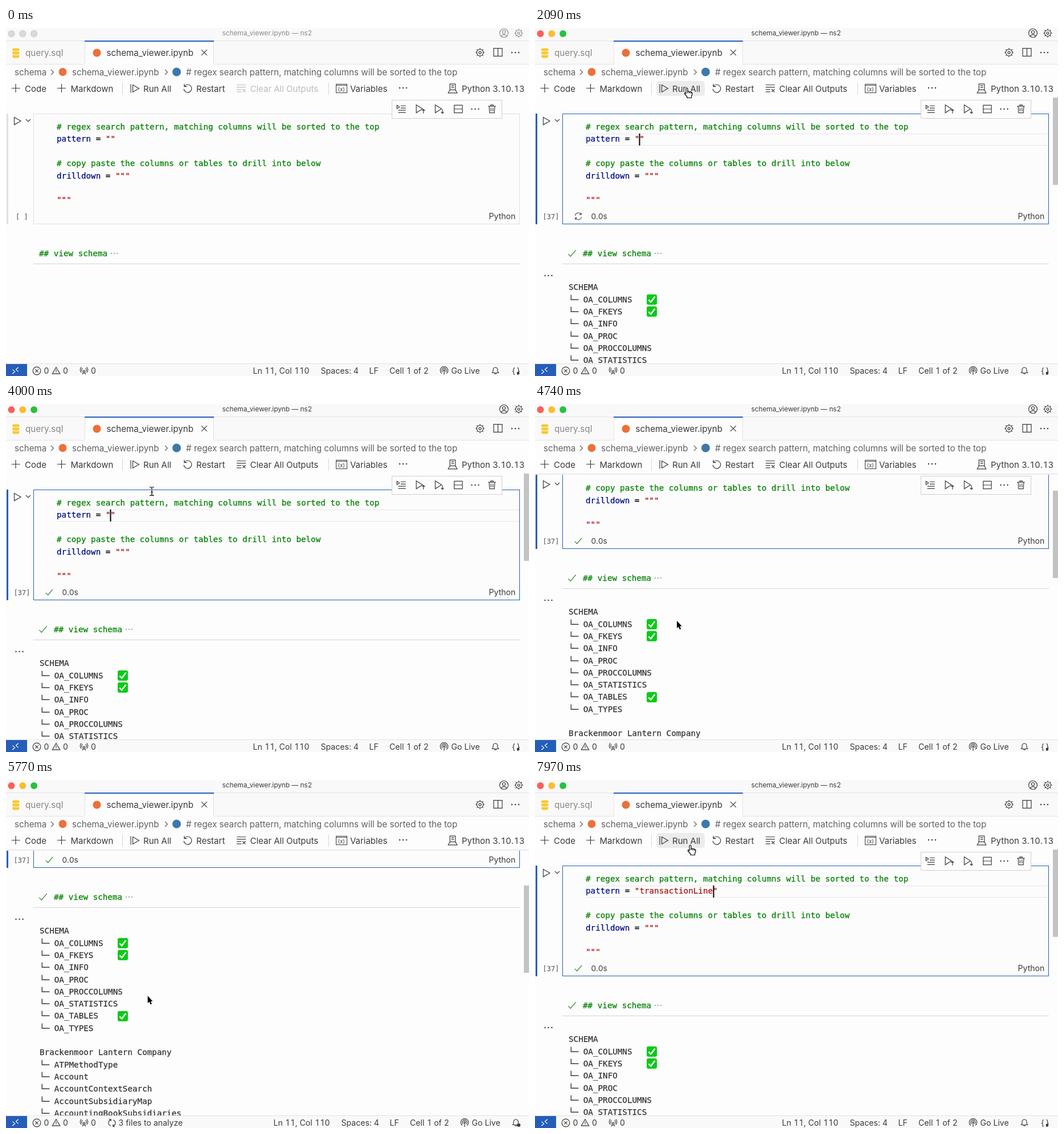
Animation, 918 px wide and 610 px high, one loop 8000 ms. Source, as an HTML page with a canvas:

```html
<!DOCTYPE html>
<html lang="en">
<head>
<meta charset="utf-8">
<title>Schema viewer</title>
<style>
html, body { margin: 0; width: 918px; height: 610px; overflow: hidden; background: #fdfdfd; }
canvas { display: block; }
</style>
</head>
<body>
<canvas id="stage" width="918" height="610"></canvas>
<script>
const ctx = document.getElementById('stage').getContext('2d');
const LOOP = 8000, START = 600, STEP = 147.4;
const UI = 'Inter, "Noto Sans", sans-serif';
const MONO = '"DejaVu Sans Mono", monospace';
const INK = '#3b3b3b', BLUE = '#255eb8', GREEN = '#008000', RED = '#a31515', NAVY = '#001080';
const LINE = '#e3e3e3', PAGE = '#fdfdfd', BAR = '#f9f9f9';

// Icons on a 16 unit grid
const ring = (r, x = 8, y = 8) => `M${x + r} ${y}A${r} ${r} 0 1 1 ${x - r} ${y}A${r} ${r} 0 1 1 ${x + r} ${y}`;
const gearTeeth = () => {
  let d = '';
  for (let i = 0; i < 8; i++) {
    const a = i * Math.PI / 4, c = Math.cos(a), s = Math.sin(a);
    d += `M${8 + 5 * c} ${8 + 5 * s}L${8 + 7 * c} ${8 + 7 * s}`;
  }
  return d;
};
const ICONS = {
  plus: 'M8 1.5V14.5M1.5 8H14.5',
  play: 'M3 2L13.5 8L3 14Z',
  right: 'M6 3.5L10.5 8L6 12.5',
  down: 'M4 6L8 10L12 6',
  close: 'M3.5 3.5L12.5 12.5M12.5 3.5L3.5 12.5',
  runAll: 'M5 2.5L14.5 8L5 13.5ZM2 1.5V14.5',
  restart: 'M3.2 4.5A6 6 0 1 1 2 8.8M2.7 1V5H6.8',
  clear: 'M1 3H15M1 6.5H15M1 10H8M1 13.5H8M10 9.5L14.5 14M14.5 9.5L10 14',
  gear: ring(5) + ring(1.8) + gearTeeth(),
  split: 'M1.5 2H14.5V14H1.5ZM8 2V14',
  rows: 'M1.5 2H14.5V14H1.5ZM1.5 8H14.5',
  lines: 'M1 2L5 4.8L1 7.5ZM7 3H15M7 6.5H15M3 10H15M3 13.5H15',
  above: 'M1.5 1.5L11.5 7.8L1.5 14ZM13 15V8.5M10.8 10.7L13 8.5L15.2 10.7',
  below: 'M1.5 1.5L11.5 7.8L1.5 14ZM13 8.5V15M10.8 12.8L13 15L15.2 12.8',
  trash: 'M2 4H14M6 4V2H10V4M3.5 4L4.2 14.5H11.8L12.5 4M6.5 6.5V12M9.5 6.5V12',
  kernel: 'M4 1.5H12V10H4ZM6 4H10M6 6.5H10M4 10L1.5 14.5H14.5L12 10',
  bell: 'M2.5 12H13.5L12 9.8V6.5A4 4 0 0 0 4 6.5V9.8ZM6.5 12.5A1.5 1.5 0 0 0 9.5 12.5',
  sync: 'M2.5 7A5.6 5.6 0 0 1 13 5M13.3 1.8V5.2H10M13.5 9A5.6 5.6 0 0 1 3 11M2.7 14.2V10.8H6',
  tower: 'M8 7L5 15M8 7L11 15M6 12.5H10M5 3.5A4 4 0 0 0 5 9.5M11 3.5A4 4 0 0 1 11 9.5M3 1.5A7 7 0 0 0 3 11.5M13 1.5A7 7 0 0 1 13 11.5',
  cast: ring(1.4, 8, 7) + 'M8 8.5V15M5.2 10A4 4 0 1 1 10.8 10M3.8 12.5A6.7 6.7 0 1 1 12.2 12.5',
  error: ring(6.5) + 'M5.5 5.5L10.5 10.5M10.5 5.5L5.5 10.5',
  warn: 'M8 2L15 14H1ZM8 6.5V10M8 11.3V12.5',
  account: ring(6.8) + ring(2.4, 8, 6.3) + 'M3.8 13.2A4.5 4.5 0 0 1 12.2 13.2',
  check: 'M1.5 9L5.5 13L14.5 2.5',
  remote: 'M2.5 6L7 10L2.5 14M13.5 2L9 6L13.5 10'
};

function icon(name, x, y, color = INK, scale = 1.15, turn = 0) {
  ctx.save();
  ctx.translate(x, y);
  ctx.rotate(turn);
  ctx.scale(scale, scale);
  ctx.translate(-8, -8);
  ctx.strokeStyle = color;
  ctx.lineWidth = 1.2 / scale;
  ctx.stroke(new Path2D(ICONS[name]));
  ctx.restore();
}
function rect(x, y, w, h, color) {
  ctx.fillStyle = color;
  ctx.fillRect(x, y, w, h);
}
function box(x, y, w, h, fill, stroke) {
  rect(x, y, w, h, fill);
  ctx.strokeStyle = stroke;
  ctx.lineWidth = 1;
  ctx.strokeRect(x + 0.5, y + 0.5, w - 1, h - 1);
}
function dot(x, y, r, color) {
  ctx.fillStyle = color;
  ctx.beginPath();
  ctx.arc(x, y, r, 0, 7);
  ctx.fill();
}
function dots(x, y, color = INK, gap = 6) {
  for (let i = -1; i < 2; i++) dot(x + i * gap, y, gap / 5, color);
}
// y is the middle of the capitals; digits share one width
function text(s, x, y, color = INK, size = 15) {
  ctx.font = size + 'px ' + UI;
  ctx.fillStyle = color;
  const digit = ctx.measureText('0').width;
  for (const part of s.split(/(\d)/)) {
    const w = ctx.measureText(part).width, isDigit = /\d/.test(part);
    ctx.fillText(part, x + (isDigit ? (digit - w) / 2 : 0), y + size * 0.35);
    x += isDigit ? digit : w;
  }
}
function code(s, x, y, color, size = 14.25) {
  ctx.font = size + 'px ' + MONO;
  ctx.fillStyle = ctx.strokeStyle = color;
  ctx.lineWidth = 0.25;
  ctx.fillText(s, x, y + size * 0.35);
  ctx.strokeText(s, x, y + size * 0.35);
}
const CHAR = 8.58;

// Pointer and scroll positions by step
const MOUSE = [[0, 862, 352], [1, 730, 300], [2, 570, 232], [3, 425, 172], [4, 325, 130], [5, 280, 110],
  [6, 266, 104], [7, 267, 105], [14, 267, 105], [15, 268, 107], [16, 268, 107], [20, 266, 117], [21, 262, 128],
  [23, 256, 153], [24, 254, 200], [25, 251, 300], [26, 249, 380], [33, 249, 380], [40, 248, 374], [42, 248, 372],
  [43, 249, 350], [44, 252, 300], [45, 256, 236], [46, 262, 180], [47, 268, 142], [48, 271, 124],
  [49, 273, 116], [50, 273, 114]];
const SCROLL = [[26, 0], [27, 34], [28, 90], [29, 146], [30, 192], [31, 224], [32, 243], [33, 252],
  [34, 240], [35, 190], [36, 115], [37, 45], [38, 0]];

function track(keys, k, n) {
  if (k <= keys[0][0]) return keys[0][n];
  for (let i = 1; i < keys.length; i++) {
    const a = keys[i - 1], b = keys[i];
    if (k <= b[0]) return a[n] + (b[n] - a[n]) * (k - a[0]) / (b[0] - a[0]);
  }
  return keys[keys.length - 1][n];
}

const TREE = ['SCHEMA', '+OA_COLUMNS', '+OA_FKEYS', '+OA_INFO', '+OA_PROC', '+OA_PROCCOLUMNS', '+OA_STATISTICS',
  '+OA_TABLES', '+OA_TYPES', '', 'Brackenmoor Lantern Company', '+ATPMethodType', '+Account',
  '+AccountContextSearch', '+AccountSubsidiaryMap', '+AccountingBookSubsidiaries', '+AccountingContext',
  '+ActionType', '+Activity'];
const TICKED = [1, 2, 7];

function tickBox(x, y) {
  ctx.fillStyle = '#0bca18';
  ctx.beginPath();
  ctx.roundRect(x, y, 18, 18, 3);
  ctx.fill();
  ctx.strokeStyle = '#fff';
  ctx.lineWidth = 2.4;
  ctx.stroke(new Path2D(`M${x + 3.5} ${y + 9.5}L${x + 7.2} ${y + 13.5}L${x + 14.5} ${y + 4}`));
}

function insertButtons(y) {
  box(362, y, 71, 28, PAGE, '#d0d0d0');
  icon('plus', 376, y + 13, INK, 1);
  text('Code', 391, y + 14, INK, 14);
  box(451, y, 103, 28, PAGE, '#d0d0d0');
  icon('plus', 465, y + 13, INK, 1);
  text('Markdown', 479, y + 14, INK, 14);
}

function notebook(s) {
  const { k, top, my } = s;
  ctx.save();
  ctx.beginPath();
  ctx.rect(0, 122, 918, 466);
  ctx.clip();

  const edge = s.active ? BLUE : '#e0e0e0', bottom = 344 - top;
  rect(1, 150 - top, 3, 194, edge);
  box(48, 150 - top, 854, 194, '#fcfcfc', edge);
  if (s.active) {
    rect(89, 185 - top, 812, 1, '#e9e9e9');
    rect(89, 205 - top, 812, 1, '#e9e9e9');
  }
  code('# regex search pattern, matching columns will be sorted to the top', 89, 173 - top, GREEN);
  code('pattern', 89, 194.5 - top, NAVY);
  code('=', 89 + 8 * CHAR, 194.5 - top, '#000');
  const word = k >= 41 ? 'transactionLine' : '';
  code('"' + word + '"', 89 + 10 * CHAR, 194.5 - top, RED);
  if (s.caret) rect(Math.round(89 + (11 + word.length) * CHAR) - 0.5 + (word ? 1 : 0), 185 - top, 2, 21, '#000');
  code('# copy paste the columns or tables to drill into below', 89, 237.5 - top, GREEN);
  code('drilldown', 89, 259 - top, NAVY);
  code('=', 89 + 10 * CHAR, 259 - top, '#000');
  code('"""', 89 + 12 * CHAR, 259 - top, RED);
  code('"""', 89, 301.5 - top, RED);

  if (bottom > 165) {
    const y = Math.max(163 - top, 141);
    icon('play', 20, y, INK, 1.1);
    icon('down', 39, y - 1, INK, 1);
  }
  const count = k < 9 ? '[ ]' : k < 10 ? '[*]' : '[37]';
  code(count, count.length > 3 ? 13.5 : 17, 331 - top, '#707070', 12);
  if (k >= 9) {
    if (k < 12) icon('sync', 76, 330 - top, '#555', 1, k * 0.9 - 9);
    else icon('check', 76, 330 - top, '#388a34', 0.95);
    text('0.0s', 98.5, 330 - top, INK, 13.6);
  }
  text('Python', 847.5, 330 - top, INK, 14.1);

  if (bottom > 165) {
    box(677, 126, 194, 33, PAGE, '#d0d0d0');
    ['lines', 'above', 'below', 'rows'].forEach((n, i) => icon(n, 694 + i * 33.3, 142, INK, 1.1));
    dots(823.5, 142);
    icon('trash', 853, 141.5, INK, 1.1);
  }

  // Folded second cell
  const ran = k >= 9, x = ran ? 84 : 58;
  if (k >= 10) icon('check', 65, 395 - top, '#388a34', 1.05);
  else if (ran) icon('sync', 65, 395 - top, '#555', 1);
  code('## view schema', x, 395.5 - top, GREEN);
  dots(x + 132, 395 - top, '#888', 5);
  rect(48, 413 - top, 854, 1, '#d3d3d3');

  if (k >= 10) {
    dots(23.5, 434 - top);
    TREE.forEach((row, i) => {
      const y = 454.2 + i * 21.33 - top;
      code(row.replace('+', '└─ '), 59, y, '#333');
      if (TICKED.includes(i)) tickBox(196, Math.round(y - 8.6));
    });
  }

  if (s.active && my > 344 - top && my < 394 - top) insertButtons(337 - top);
  if (k > 16 && !top && my > 119 && my < 150) insertButtons(123);
  if (top > 5) {
    rect(0, 122, 918, 1, '#e2e2e2');
    rect(0, 123, 918, 1, '#f3f3f3');
  }
  if (k >= 10 && (k < 15 || k > 20)) rect(909, 122 + Math.round(top / 3), 9, 153, '#c3c3c3');
  ctx.restore();
}

function header(s) {
  const top = s.active ? INK : '#8a8a8a';
  rect(0, 0, 918, 122, PAGE);
  rect(0, 0, 918, 22, BAR);
  ['#fb5f57', '#fdbc2e', '#28c23f'].forEach((c, i) => {
    dot(9.5 + i * 19.8, 10, 6, s.active ? c : '#c4c4c4');
    if (!s.active) dot(9.5 + i * 19.8, 10, 5.2, '#dadada');
  });
  text('schema_viewer.ipynb — ns2', 379.5, 9, top, 11.8);
  icon('account', 874, 9, top, 1.1);
  icon('gear', 900, 9, top, 1.1);

  rect(0, 22, 918, 42, BAR);
  rect(0, 22, 918, 1, LINE);
  rect(0, 63, 918, 1, LINE);
  rect(138, 22, 227, 42, PAGE);
  rect(138, 22, 1, 42, LINE);
  rect(364, 22, 1, 42, LINE);
  rect(138, 22, 227, 2, BLUE);

  // Database drum
  ctx.fillStyle = '#f5c932';
  for (let i = 0; i < 3; i++) {
    ctx.beginPath();
    ctx.roundRect(11, 35.5 + i * 6, 12.5, 5, [i ? 1 : 4, i ? 1 : 4, 4, 4]);
    ctx.fill();
  }
  text('query.sql', 34, 44, '#868686', 15.2);
  dot(159.5, 43.5, 7, '#ec7038');
  text('schema_viewer.ipynb', 176.5, 44, INK, 15.2);
  icon('close', 348, 43, INK, 1.1);
  icon('gear', 832, 43, INK, 1.15);
  icon('split', 863.5, 42.5, INK, 1.15);
  dots(894, 43);

  const soft = '#616161';
  text('schema', 15, 78, soft, 15.2);
  icon('right', 81, 77.5, soft, 1);
  dot(99.5, 77, 7, '#ec7038');
  text('schema_viewer.ipynb', 116, 78, soft, 15.2);
  icon('right', 281, 77.5, soft, 1);
  dot(299.5, 77, 7.5, '#3d78ab');
  text('# regex search pattern, matching columns will be sorted to the top', 316, 78, soft, 15.2);

  if (s.hover) {
    ctx.fillStyle = '#ececec';
    ctx.beginPath();
    ctx.roundRect(213, 93, 85, 26, 5);
    ctx.fill();
  }
  icon('plus', 17, 105.5);
  text('Code', 33, 106.5);
  icon('plus', 97.5, 105.5);
  text('Markdown', 113.5, 106.5);
  rect(204, 96, 1, 21, '#d4d4d4');
  icon('runAll', 226, 106);
  text('Run All', 241, 106.5);
  icon('restart', 319, 106);
  text('Restart', 334, 106.5);
  const faint = s.k >= 9 ? INK : '#bcbcbc';
  icon('clear', 413, 105.5, faint);
  text('Clear All Outputs', 428.5, 106.5, faint);
  rect(566, 96, 1, 21, '#d4d4d4');
  box(579, 98, 20, 16, PAGE, INK);
  rect(579, 100, 20, 1, INK);
  text('(x)', 582.5, 107.5, INK, 9.5);
  text('Variables', 604, 106.5);
  dots(697, 105);
  icon('kernel', 784, 106, INK, 1.2);
  text('Python 3.10.13', 800, 106.5);
}

function statusBar(s) {
  rect(0, 588, 918, 22, BAR);
  rect(0, 588, 918, 1, LINE);
  rect(0, 589, 37, 21, BLUE);
  icon('remote', 16.5, 600.5, '#fff', 0.95);
  const t = (str, x) => text(str, x, 601, INK, 14.1);
  icon('error', 54, 601, INK, 1.05);
  t('0', 66.5);
  icon('warn', 88, 600.5, INK, 0.95);
  t('0', 100);
  icon('tower', 137, 600.5, INK, 0.95);
  t('0', 149);
  const busy = s.k >= 32 && s.k < 38, dx = busy ? 36 : 0;
  if (busy) {
    icon('sync', 186, 601, INK, 1, (s.k - 33) * 0.9);
    t('3 files to analyze', 197.5);
  }
  t('Ln 11, Col 110', 433.5 + dx);
  t('Spaces: 4', 552.5 + dx);
  t('LF', 637.5 + dx);
  t('Cell 1 of 2', 673 + dx);
  icon('cast', 769 + dx, 601, INK, 1);
  t('Go Live', 781.5 + dx);
  icon('bell', 859 + dx, 600.5, INK, 1);
  if (busy) dot(900, 605, 3, INK);
  else {
    t('{', 888);
    t('}', 896.5);
    dot(899, 605, 2.4, INK);
  }
}

function pointer(kind, x, y) {
  const shape = {
    arrow: 'M0 0V13L3 10.4L5 15.2L7.2 14.3L5.2 9.6H8.8Z',
    hand: 'M-2 1.5Q-2 0 -.5 0T1 1.5V6.5Q3 5.5 4 7Q6 6 7 7.7Q9 7.2 9 9.5Q9 13 7.5 15V17.5H0V15.5L-4.5 10.5Q-5 8.5 -3.5 8.5L-2 10Z',
    beam: 'M-4 -7.5Q0 -7.5 0 -5.5Q0 -7.5 4 -7.5M0 -5.5V5.5M-4 7.5Q0 7.5 0 5.5Q0 7.5 4 7.5M-2 1.5H2'
  }[kind];
  const path = new Path2D(shape);
  ctx.save();
  ctx.translate(x, y);
  ctx.lineJoin = 'round';
  ctx.strokeStyle = '#fff';
  ctx.lineWidth = kind === 'hand' ? 3 : 2.4;
  ctx.stroke(path);
  if (kind === 'arrow') {
    ctx.fillStyle = '#000';
    ctx.fill(path);
  } else {
    ctx.fillStyle = '#fff';
    if (kind === 'hand') ctx.fill(path);
    ctx.strokeStyle = '#000';
    ctx.lineWidth = 1.2;
    ctx.stroke(path);
    if (kind === 'hand') ctx.stroke(new Path2D('M1 6.5V9M4 7V9.5M7 8V10'));
  }
  ctx.restore();
}

function draw(t) {
  const k = Math.floor((t - START) / STEP);
  const mx = track(MOUSE, k, 1), my = track(MOUSE, k, 2), top = Math.round(track(SCROLL, k, 1));
  const active = k >= 8;
  const blink = t < 6640 ? t - 1780 : t - 6640;
  const s = { k, top, my, active };
  s.caret = active && blink % 1000 < 500;
  s.hover = active && my < 119 && mx > 213 && mx < 298;

  rect(0, 0, 918, 610, PAGE);
  notebook(s);
  header(s);
  statusBar(s);
  if (k >= 0) {
    const inCell = active && my >= 150 && my < 344 - top;
    pointer(s.hover ? 'hand' : inCell ? 'beam' : 'arrow', mx, my);
  }
}

const begin = performance.now();
function tick() {
  draw((performance.now() - begin) % LOOP);
  requestAnimationFrame(tick);
}
tick();
</script>
</body>
</html>
```
